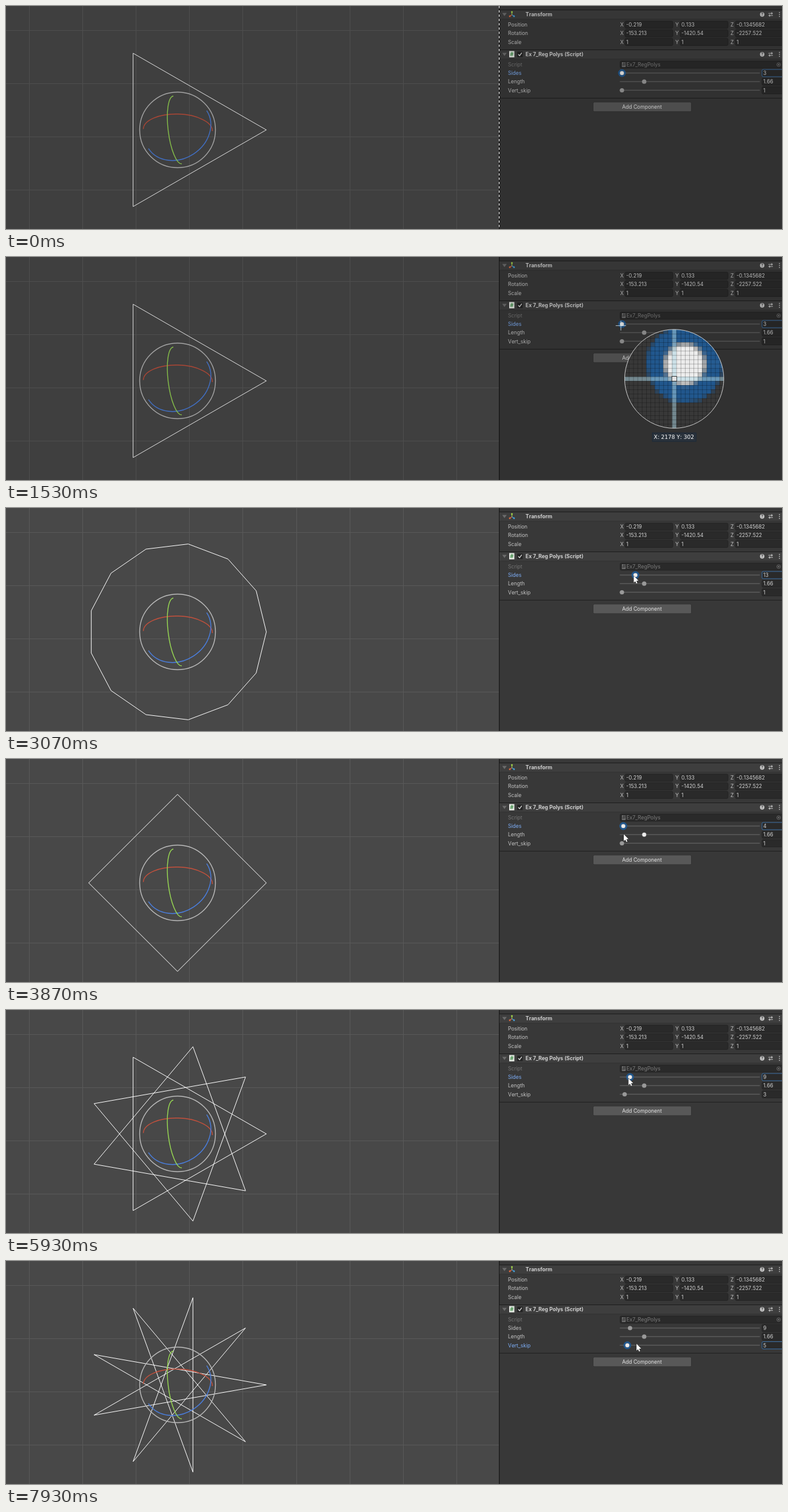
These frames come from a looping animation (1280x369 px, 8 s). An HTML page with a canvas:

```html
<!DOCTYPE html>
<html lang="en">
<head>
<meta charset="utf-8">
<title>Regular polygons</title>
<style>
html, body { margin: 0; width: 100%; height: 100%; overflow: hidden; background: #484848; }
canvas { display: block; }
</style>
</head>
<body>
<canvas id="stage" width="1280" height="369"></canvas>
<script>
const W = 1280, H = 369, LOOP = 8000;
const SCALE = 0.711;                 // stage pixels per screen pixel
const SNIP_END = 1730;
const ROWS = { sides: 111, length: 125.2, skip: 139.5 };

const stage = document.getElementById('stage').getContext('2d');
const screenCanvas = document.createElement('canvas');
screenCanvas.width = 1800;
screenCanvas.height = 519;
const screenCtx = screenCanvas.getContext('2d');
stage.fontKerning = screenCtx.fontKerning = 'none';
let g = stage;

// pointer path: time, x, y
const PATH = [
  [130, 133, 372], [530, 430, 300], [930, 888, 100], [1000, 888, 100],
  [1530, 1014.2, 113.6], [2270, 1014.2, 113.6], [2330, 1021, 112],
  [2670, 1034, 112], [2800, 1034, 112], [3000, 1038, 112], [3530, 1019, 114],
  [3600, 1019, 114], [3670, 1016.6, 116], [3870, 1019, 124.5],
  [4130, 1017, 140], [4330, 1017, 140], [4400, 1019, 140], [4530, 1019, 140],
  [4600, 1021, 141], [5270, 1016, 113], [5330, 1016, 113], [6000, 1028, 113],
  [6130, 1028, 113], [6270, 1021, 140], [6600, 1030, 142], [6860, 1030, 142],
  [7130, 1026, 143], [7200, 1026, 143], [7400, 1021.5, 145],
  [7730, 1025, 146], [7800, 1025, 146], [7930, 1040, 137]
];

function pointer(t) {
  const i = PATH.findIndex(p => p[0] >= t);
  if (i < 0) return PATH[PATH.length - 1].slice(1);
  if (i === 0) return PATH[0].slice(1);
  const [t0, x0, y0] = PATH[i - 1], [t1, x1, y1] = PATH[i];
  const f = (t - t0) / (t1 - t0);
  return [x0 + (x1 - x0) * f, y0 + (y1 - y0) * f];
}

// values follow the pointer while a knob is dragged
const dragged = (t, end, origin) => Math.round((pointer(Math.min(t, end))[0] - origin) / 2.2);

function sidesAt(t) {
  if (t < 2330) return 3;
  return 3 + dragged(t, t < 5400 ? 3670 : 6000, 1014.4);
}

function skipAt(t) {
  if (t < 4330) return 1;
  return 1 + dragged(t, t < 6270 ? 4600 : 7730, 1017);
}

function focusAt(t) {
  return t < 4330 || (t >= 5400 && t < 6270) ? 'sides' : 'skip';
}

function rect(x, y, w, h, color) {
  g.fillStyle = color;
  g.fillRect(x, y, w, h);
}

function disc(x, y, r, color) {
  g.fillStyle = color;
  g.beginPath();
  g.arc(x, y, r, 0, 7);
  g.fill();
}

function path(points, color, width = 1, closed = false) {
  g.beginPath();
  points.forEach(([x, y]) => g.lineTo(x, y));
  if (closed) g.closePath();
  g.strokeStyle = color;
  g.lineWidth = width;
  g.stroke();
}

function text(s, x, y, color = '#c4c4c4', weight = 400, align = 'left') {
  g.font = `${weight} 8.53px Inter, sans-serif`;
  g.textAlign = align;
  g.fillStyle = color;
  g.fillText(s, x, y + 3.1);
}

function field(x, y, w, value, focused) {
  g.fillStyle = '#2a2a2a';
  g.strokeStyle = focused ? '#3a79bb' : '#222';
  g.lineWidth = .8;
  g.beginPath();
  g.roundRect(x + .5, y - 6, w, 12, 2);
  g.fill();
  g.stroke();
  text(value, x + 2.5, y, '#d2d2d2');
}

function polygon(sides, skip) {
  const vertex = i => {
    const a = i % sides / sides * 2 * Math.PI;
    return [282.9 + 146.5 * Math.cos(a), 205 - 146.5 * Math.sin(a)];
  };
  for (let i = 0; i < sides; i++) path([vertex(i), vertex(i + skip)], '#fff');
}

function arc(x, y, rx, ry, turn, from, to, color, width = 1.4) {
  g.beginPath();
  g.ellipse(x, y, rx, ry, turn, from, to);
  g.strokeStyle = color;
  g.lineWidth = width;
  g.stroke();
}

function gizmo() {
  const PI = Math.PI;
  arc(283.5, 205.3, 57, 26.5, .03, PI, 2 * PI, '#c4503c');
  arc(283, 204.5, 57.4, 48.2, -.58, 0, PI, '#4a7fe0');
  arc(283, 205, 56.5, 15.5, 1.447, 0, PI, '#98d953');
  arc(283, 205, 62.5, 62.5, 0, 0, 2 * PI, '#bababa');
}

function header(y, title) {
  rect(814, y - 8, 466, 1, '#1c1c1c');
  rect(814, y - 7, 466, 14.5, '#3e3e3e');
  rect(814, y + 7.5, 466, .7, '#303030');
  g.fillStyle = '#6c6c6c';
  g.beginPath();
  g.moveTo(818.5, y - 2.5);
  g.lineTo(826, y - 2.5);
  g.lineTo(822.2, y + 2.8);
  g.fill();
  text(title, 857, y, '#d2d2d2', 700);
  disc(1247.3, y, 3.7, '#c4c4c4');
  g.font = '700 6.5px Inter, sans-serif';
  g.textAlign = 'center';
  g.fillStyle = '#3e3e3e';
  g.fillText('?', 1247.3, y + 2.4);
  for (const [dy, knob] of [[-1.8, 1263], [1.8, 1259.5]]) {
    rect(1257.5, y + dy - .5, 7.5, 1, '#c4c4c4');
    rect(knob - .6, y + dy - 1.8, 1.3, 3.6, '#c4c4c4');
  }
  for (const dy of [-3.3, 0, 3.3]) rect(1275, y + dy - .7, 1.5, 1.5, '#c4c4c4');
}

function slider(name, label, value, knobX, focus, hover) {
  const y = ROWS[name], focused = name === focus;
  text(label, 828, y, focused ? '#7fb0fa' : '#c4c4c4');
  rect(1012.5, y - .8, 231, 1.4, '#5e5e5e');
  if (focused) disc(knobX, y, 6.4, 'rgba(30,92,154,.87)');
  disc(knobX, y, 3.6, '#999');
  if (focused || hover) disc(knobX, y, 3.1, '#ececec');
  field(1246.5, y, 40, value, focused);
}

// axis of the transform icon, with a blunt tip
function axis(x, y, color) {
  path([[834.5, 14.5], [x, y]], color, 1.2);
  disc(x, y, 1.4, color);
}

function inspector(t, sides, skip) {
  rect(813, 0, 467, H, '#383838');
  rect(813, 0, 1.3, H, '#191919');

  header(14, 'Transform');
  axis(834.5, 10, '#a5d84a');
  axis(831, 17, '#e0683c');
  axis(838, 17, '#48a0d8');
  const rows = [
    ['Position', '-0.219', '0.133', '-0.1345682'],
    ['Rotation', '-153.213', '-1420.54', '-2257.522'],
    ['Scale', '1', '1', '1']
  ];
  rows.forEach(([label, ...values], i) => {
    const y = 31 + i * 14.2;
    text(label, 828, y);
    values.forEach((v, j) => {
      const x = 1013 + j * 91;
      text('XYZ'[j], x, y);
      field(x + 7.5, y, 79, v);
    });
  });

  header(80, 'Ex 7_Reg Polys (Script)');
  rect(830, 74.5, 8.5, 10.5, '#e4e8e2');
  text('#', 834.2, 80, '#3b8a45', 700, 'center');
  rect(843.3, 75.5, 9, 9, '#232323');
  path([[845, 80], [847.2, 82.3], [850.7, 77.4]], '#e0e0e0', 1.3);

  text('Script', 828, 97, '#757575');
  field(1012.5, 97, 275, '');
  rect(1016, 93.2, 5.8, 7.6, '#838383');
  text('#', 1018.9, 97, '#333', 700, 'center');
  text('Ex7_RegPolys', 1023.5, 97, '#7d7d7d');
  arc(1274.5, 97, 3, 3, 0, 0, 7, '#777', .8);
  disc(1274.5, 97, 1.2, '#777');

  const focus = focusAt(t), pointerY = pointer(t)[1];
  const hover = name => t >= SNIP_END && Math.abs(pointerY - ROWS[name]) < 7;
  slider('sides', 'Sides', sides, 1016 + 2.22 * (sides - 3), focus, hover('sides'));
  slider('length', 'Length', '1.66', 1052.7, focus, hover('length'));
  slider('skip', 'Vert_skip', skip, 1016 + 2.22 * (skip - 1), focus, hover('skip'));
  rect(814, 152, 466, 1, '#1f1f1f');

  g.fillStyle = '#585858';
  g.strokeStyle = '#303030';
  g.lineWidth = .8;
  g.beginPath();
  g.roundRect(968.5, 159, 162, 15.8, 2);
  g.fill();
  g.stroke();
  text('Add Component', 1049, 167, '#e4e4e4', 400, 'center');
}

function editor(t) {
  const sides = sidesAt(t), skip = skipAt(t);
  rect(0, 0, W, H, '#484848');
  for (let i = 0; i < 9; i++) rect(Math.round(37.6 + i * 88.2), 0, 1, H, '#595959');
  for (let i = 0; i < 4; i++) rect(0, Math.round(39.8 + i * 88.2), 813, 1, '#595959');
  polygon(sides, skip);
  gizmo();
  inspector(t, sides, skip);
}

function arrow([x, y]) {
  const shape = [[0, 0], [0, 11.2], [2.5, 8.9], [4.3, 12.7], [6, 11.9], [4.3, 8.2], [7.8, 7.9]];
  const points = shape.map(([dx, dy]) => [x + dx, y + dy]);
  path(points, '#222', 1, true);
  g.fillStyle = '#fff';
  g.fill();
}

function lens(t, [x, y]) {
  const cells = 23, size = cells * 10 * SCALE, cell = size / cells;
  const cx = x + 88, cy = y + 88, left = cx - size / 2, top = cy - size / 2;

  g = screenCtx;
  g.setTransform(1 / SCALE, 0, 0, 1 / SCALE, 0, 0);
  editor(t);
  g = stage;

  g.save();
  g.beginPath();
  g.arc(cx, cy, size / 2, 0, 7);
  g.clip();
  rect(left, top, size, size, '#383838');
  g.imageSmoothingEnabled = false;
  g.drawImage(screenCanvas, Math.floor(x / SCALE) - 11, Math.floor(y / SCALE) - 11,
    cells, cells, left, top, size, size);
  const band = 'rgba(173,216,230,.5)', reach = (size - cell) / 2;
  for (const d of [-size / 2, cell / 2]) {
    rect(cx + d, cy - cell / 2, reach, cell, band);
    rect(cx - cell / 2, cy + d, cell, reach, band);
  }
  for (let i = 1; i < cells; i++) {
    rect(left + i * cell, top, .7, size, 'rgba(0,0,0,.35)');
    rect(left, top + i * cell, size, .7, 'rgba(0,0,0,.35)');
  }
  g.restore();

  g.lineWidth = .8;
  g.strokeStyle = '#111';
  g.strokeRect(cx - 4, cy - 4, 8, 8);
  g.strokeStyle = '#eee';
  g.strokeRect(cx - 3, cy - 3, 6, 6);
  arc(cx, cy, size / 2, size / 2, 0, 0, 7, '#f0f0f0', .8);

  rect(cx - 36.5, cy + 89, 73, 15, '#1c2a3a');
  rect(cx - 35.5, cy + 90, 71, 13, '#2a323b');
  g.font = '9px "DejaVu Sans", sans-serif';
  g.textAlign = 'center';
  g.fillStyle = '#fff';
  const sx = Math.round(2178 + (x - 1014.2) / SCALE);
  const sy = Math.round(302 + (y - 113.6) / SCALE);
  g.fillText(`X: ${sx} Y: ${sy}`, cx - .5, cy + 99.5);
}

function snip(t, at) {
  rect(0, 0, W, H, 'rgba(0,0,0,.125)');
  // the window outline goes once the pointer is inside the panel
  if (t < 1070) {
    rect(813, 0, 1, H, '#111');
    g.setLineDash([3.6, 3.5]);
    path([[813.5, 0], [813.5, H]], '#fff');
    g.setLineDash([]);
  }
  if (t < 130) return;
  const [x, y] = at;
  lens(t, at);
  path([[x - 8.5, y], [x + 8.5, y]], '#d8eefa', .8);
  path([[x, y - 8], [x, y + 8]], '#d8eefa', .8);
}

function draw(now) {
  const step = Math.floor((now % LOOP + 4) * .015);
  const t = Math.round(step * 100 / 15) * 10 % LOOP;
  const at = pointer(t);
  editor(t);
  if (t < SNIP_END) snip(t, at);
  else arrow(at);
}

const start = performance.now();
function tick() {
  draw(performance.now() - start);
  requestAnimationFrame(tick);
}
tick();
</script>
</body>
</html>
```
